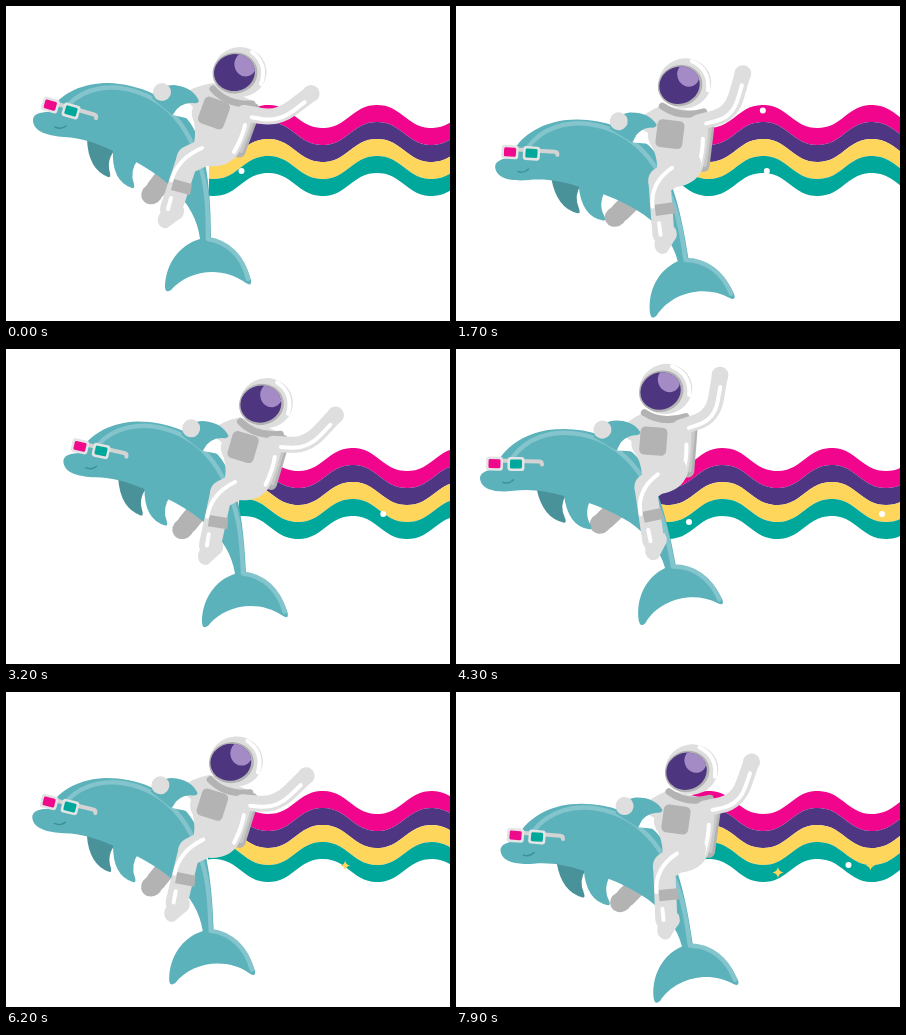
An HTML page that plays this animation: 444 px wide and 315 px high, repeating every 8000 ms.

```html
<!DOCTYPE html>
<html lang="en">
<head>
<meta charset="utf-8">
<title>Astronaut riding a dolphin</title>
<style>
  html, body { margin: 0; width: 100%; height: 100%; overflow: hidden; background: #fff; }
  svg { display: block; width: 444px; height: 315px; }
  path { stroke-linecap: round; stroke-linejoin: round; }
  .line { fill: none; }
  .skin { fill: #5cb2bb; }
  .shine { fill: none; stroke: #84c4cc; stroke-width: 4.5; }
  .dark { fill: #4a929a; }
  .suit { fill: #dedede; }
  .limb { fill: none; stroke: #dedede; }
  .grey { fill: #b3b3b3; }
  .gloss { fill: none; stroke: #fff; stroke-width: 4; }
</style>
</head>
<body>
<svg viewBox="0 0 444 315">
  <g id="ribbon"></g>
  <g id="sparks"></g>
  <g id="rider">
    <g id="pack">
      <path class="grey" d="M240 94L251 98Q255 101 254 107L239 148Q236 153 231 151L220 146Z"/>
      <path class="line" d="M249 108L235 145" stroke="#c9c9c9" stroke-width="4"/>
    </g>
    <g id="backLeg">
      <path class="line" d="M165 163L150 183" stroke="#b3b3b3" stroke-width="20"/>
      <ellipse class="grey" cx="146" cy="188" rx="11" ry="10" transform="rotate(-35 146 188)"/>
    </g>
    <path class="dark" d="M81 133Q82 163 102 171Q105 172 104 167Q100 153 110 143Z"/>
    <g id="dolphin">
      <path class="skin" d="M27 114C27 108 34 106 43 106C55 86 78 77 102 77C133 78 162 91 182 114
        C198 134 205 174 205 234C224 235 239 252 245 274Q246 281 240 277
        C216 259 182 264 165 284Q159 288 159 280C160 258 173 239 194 233
        C192 214 182 197 167 182C148 165 129 154 105 144C90 137 76 132 58 131C43 130 27 126 27 114Z"/>
      <path class="shine" d="M62 99C78 82 106 76 134 87C172 101 191 137 199 180C202 198 202 216 202 233C222 236 237 251 242 273"/>
      <path class="skin" d="M107 143Q105 175 126 182Q129 183 128 178Q123 165 133 152Z"/>
      <path class="line" d="M49 121Q55 124 60 120" stroke="#3f8f98" stroke-width="1.4"/>
    </g>
    <path d="M167 109Q174 94 194 94L197 108L188 114Z" fill="#fff"/>
    <g id="torso">
      <path class="suit" d="M207 77L249 96Q247 118 232 148Q222 162 202 160L186 144Q191 130 188 116Q184 108 187 101L176 90Q186 80 207 77Z"/>
      <rect class="grey" x="-13.5" y="-14" width="27" height="28" rx="5" transform="translate(208 107) rotate(20)"/>
      <path class="gloss" d="M239 119Q236 132 228 146"/>
      <g id="upper">
        <path class="line" d="M207 83Q221 99 246 98" stroke="#b3b3b3" stroke-width="7"/>
        <path id="arm" class="limb" stroke-width="16"/>
        <path id="armGloss" class="gloss" transform="translate(1 3)"/>
        <circle id="hand" class="suit" r="8.5"/>
        <ellipse class="suit" cx="234" cy="66" rx="26.5" ry="25"/>
        <path class="gloss" d="M246 46Q262 58 255 78"/>
        <g transform="rotate(-8 229 67)">
          <ellipse class="grey" cx="229" cy="67" rx="22.5" ry="20.5"/>
          <clipPath id="glass"><ellipse cx="228.5" cy="66.5" rx="20.5" ry="18.5"/></clipPath>
          <g clip-path="url(#glass)">
            <rect x="205" y="45" width="50" height="45" fill="#4d3580"/>
            <ellipse cx="240.5" cy="60" rx="11" ry="12" fill="#a58bc6"/>
          </g>
        </g>
      </g>
    </g>
    <path class="skin" d="M146 92Q153 79 168 79Q187 81 193 95Q192 98 187 97Q174 96 166 109Z"/>
    <circle class="suit" cx="156" cy="86" r="9"/>
    <g id="leg">
      <path class="limb" d="M212 140L184 153" stroke-width="27"/>
      <g id="shin">
        <path class="limb" d="M181 155L165 203" stroke-width="22"/>
        <path class="grey" d="M168 173L186 178L184 189L165 184Z"/>
        <path class="suit" d="M155 206L162 198L178 202Q179 211 172 214L161 222Q154 223 152 216Q151 211 155 206Z"/>
        <path class="gloss" d="M162 203L165 192"/>
      </g>
      <path id="legGloss" class="gloss"/>
    </g>
    <g id="glasses">
      <path class="line" d="M-23 -3H23Q26 -3 26 0" stroke="#d3d3d3" stroke-width="4"/>
      <rect x="-30" y="-7" width="17" height="14" rx="3" fill="#e4e4e4"/>
      <rect x="-8.5" y="-7" width="17" height="14" rx="3" fill="#e4e4e4"/>
      <rect x="-27.5" y="-4.5" width="12" height="9" rx="1.5" fill="#ee0a8b"/>
      <rect x="-6" y="-4.5" width="12" height="9" rx="1.5" fill="#00a79b"/>
    </g>
  </g>
</svg>
<script>
  const LOOP = 8000, STEP = 100;
  const $ = id => document.getElementById(id);
  const NS = "http://www.w3.org/2000/svg";

  // time, x and y of the front lens, tilt in degrees
  const POSES = [
    [0, 65, 105, 0], [900, 62, 137, -6.4], [1400, 68, 146, -8.5], [1900, 81, 145, -7.7],
    [2400, 94, 124, -3.7], [2800, 98, 112, -2.2], [3200, 95, 102, -2.3], [3600, 81, 103.5, -5.8],
    [4000, 68, 109, -9.2], [4300, 60, 115, -9.9], [4700, 58, 119, -8.8], [5400, 60, 112, -4.3],
    [5800, 63.5, 105.5, -0.6], [6200, 64, 115, -1.7], [6900, 62, 137, -6.4],
    [7400, 68, 146, -8.5], [7900, 81, 145, -7.7], [8000, 84, 142, -7.1]
  ];
  const STRIPES = ["#f0058c", "#4e3682", "#ffd65c", "#00a79b"];
  const WAVE = 109, SPEED = 0.0264, DRIFT = 0.0443;

  // birth, x at time zero, y, star radius (0 for a dot)
  const SPARKS = [
    [0, 235.5, 165, 0], [950, 231.5, 104.5, 0], [3900, 42.5, 173, 0],
    [5600, 64.5, 173.5, 5], [7000, -28, 180.5, 5.5]
  ];

  function make(tag, parent, fill) {
    const el = document.createElementNS(NS, tag);
    el.setAttribute("fill", fill);
    return parent.appendChild(el);
  }
  const bands = STRIPES.map(c => make("path", $("ribbon"), c));
  const sparks = SPARKS.map(s => make("path", $("sparks"), s[3] ? "#ffd65c" : "#fff"));

  function slope(i, k) {
    const a = POSES[Math.max(i - 1, 0)], b = POSES[Math.min(i + 1, POSES.length - 1)];
    return (b[k] - a[k]) / (b[0] - a[0]);
  }

  // cubic Hermite curve through the poses
  function pose(t) {
    let i = 0;
    while (i < POSES.length - 2 && POSES[i + 1][0] <= t) i++;
    const p = POSES[i], q = POSES[i + 1], d = q[0] - p[0], u = (t - p[0]) / d;
    const ease = u * u * (3 - 2 * u);
    return [1, 2, 3].map(k => p[k] + (q[k] - p[k]) * ease
      + d * u * (1 - u) * ((1 - u) * slope(i, k) - u * slope(i + 1, k)));
  }

  const polar = (p, deg, r) => [p[0] + r * Math.cos(deg * Math.PI / 180), p[1] + r * Math.sin(deg * Math.PI / 180)];
  const mix = (a, b, k) => a.map((v, i) => v + (b[i] - v) * k);
  const spin = (id, deg, x, y) => $(id).setAttribute("transform", `rotate(${deg} ${x} ${y})`);
  const shift = (id, x, y) => $(id).setAttribute("transform", `translate(${x} ${y})`);

  function drawRibbon(t, left) {
    const crest = 262 + SPEED * t;
    // a little third harmonic rounds the crests
    const wave = a => (Math.cos(a) - .04 * Math.cos(3 * a)) / .96;
    const edge = (x, n) => 110.5 + 17 * n - 11.5 * wave(2 * Math.PI * (x - crest) / WAVE);
    bands.forEach((band, n) => {
      const top = [], low = [];
      for (let x = left; x < 452; x += 4) {
        top.push(`${x} ${edge(x, n)}`);
        low.unshift(`${x} ${edge(x, n + 1)}`);
      }
      band.setAttribute("d", `M${top.join("L")}L${low.join("L")}Z`);
    });
  }

  function drawSparks(t) {
    SPARKS.forEach(([birth, x, y, r], i) => {
      const el = sparks[i];
      const size = Math.min(1, Math.max(0, (t - birth) / 200 + (birth ? 0 : 1)));
      el.setAttribute("d", r
        ? `M0 ${-r}Q${r * .15} ${-r * .15} ${r} 0Q${r * .15} ${r * .15} 0 ${r}Q${-r * .15} ${r * .15} ${-r} 0Q${-r * .15} ${-r * .15} 0 ${-r}Z`
        : "M-3 0A3 3 0 1 1 3 0A3 3 0 1 1 -3 0Z");
      el.setAttribute("transform", `translate(${x + DRIFT * t} ${y}) scale(${size})`);
    });
  }

  function drawArm(tilt) {
    const shoulder = [238, 107];
    const elbow = polar(shoulder, 10 + 1.3 * tilt, 34);
    const hand = polar(elbow, -37 + 2.8 * tilt, 42);
    const a = mix(elbow, shoulder, .5), b = mix(elbow, hand, .45);
    $("arm").setAttribute("d", `M${shoulder}L${a}Q${elbow} ${b}L${hand}`);
    $("armGloss").setAttribute("d", `M${mix(shoulder, elbow, .2)}L${a}Q${elbow} ${b}L${mix(b, hand, .6)}`);
    $("hand").setAttribute("cx", hand[0]);
    $("hand").setAttribute("cy", hand[1]);
  }

  function drawLegGloss(swing) {
    const knee = [182, 153];
    const bend = polar(knee, 185 + swing * .6, 10);
    const shin = polar(knee, 128 + swing, 27);
    $("legGloss").setAttribute("d", `M${shin}Q${bend} 196 142`);
  }

  function draw(t) {
    const [x, y, tilt] = pose(t);
    $("rider").setAttribute("transform", `translate(${x - 65} ${y - 105}) rotate(${tilt} 65 105)`);
    spin("pack", .57 * tilt, 197, 145);
    spin("torso", .57 * tilt, 197, 145);
    shift("upper", 0, .6 * tilt);
    spin("backLeg", -2 * tilt, 170, 160);
    shift("leg", -.7 * tilt, .25 * tilt);
    spin("shin", 1.7 * tilt, 182, 153);
    $("glasses").setAttribute("transform", `translate(65 105) rotate(${16 + .5 * tilt})`);
    drawArm(tilt);
    drawLegGloss(1.7 * tilt);
    drawRibbon(t, x + 138);
    drawSparks(t);
  }

  const begin = performance.now();
  function tick() {
    const t = (performance.now() - begin) % LOOP;
    draw(Math.floor(t / STEP) * STEP);
    requestAnimationFrame(tick);
  }
  tick();
</script>
</body>
</html>
```
